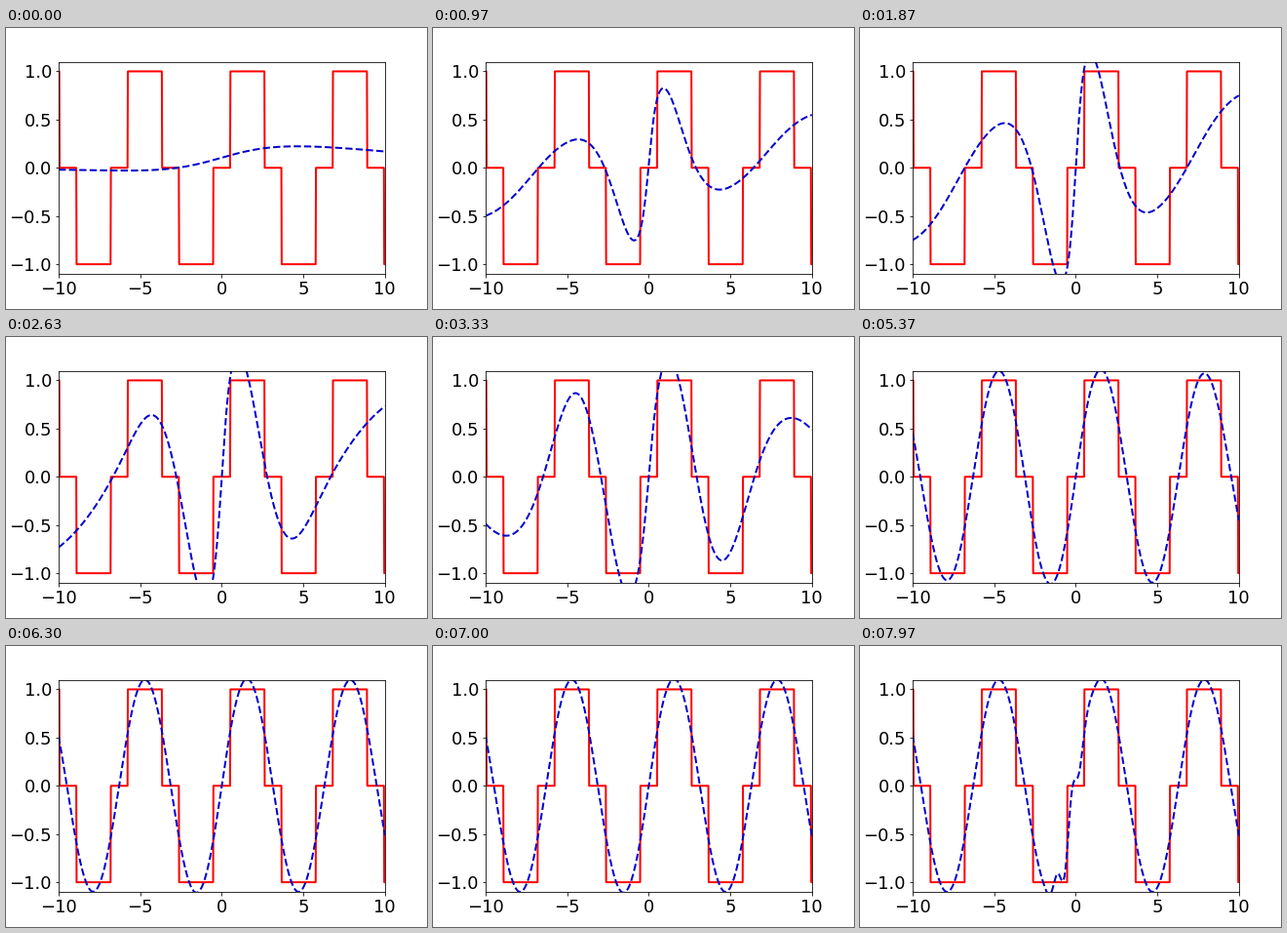
A matplotlib script that plays this animation: 432x288 px, repeating every 8000 ms.

```python
import numpy as np
import matplotlib.pyplot as plt
from matplotlib.animation import FuncAnimation

FRAMES = 240
LOOP = 8000

x = np.linspace(-10, 10, 1000)
r = np.abs(x)
steps = np.round(np.sin(x))

# Untrained curve
start = .105 + .19 * np.tanh(x / 3.3) - .0095 * x - .0003 * x**2


def smooth(u):
    u = np.clip(u, 0, 1)
    return u * u * (3 - 2 * u)


def bell(u):
    return np.exp(-u * u)


def wave(age):
    """Sine whose outer swings are stretched and damped while it is young."""
    bend = .03 + .97 * bell(age / 1.7)
    phase = r + bend * (.5 * np.tanh(2 * r) - 3.25 * (r / 10)**3)
    centre = 5 + 2.4 * age
    dip = .65 * bell(age / 2.7) * bell((r - centre) / 4.5)
    amp = 1.1 + .48 * bend * bell(r / 2) - dip
    return np.sign(x) * amp * np.sin(phase)


def kink():
    u = x + .46
    return .25 * np.sin(6 * u) * bell(u / .85)


def curve(n):
    t = n * LOOP / FRAMES / 1000
    mix = smooth(t / 1.6)
    late = np.clip(t - 7, 0, 1)**1.6
    return (1 - mix) * start + mix * wave(max(t - 1.87, 0)) + late * kink()


plt.rcParams["font.family"] = "DejaVu Sans"
fig, ax = plt.subplots(figsize=(6, 4), dpi=72)
fig.subplots_adjust(left=.125, right=.9, bottom=.125, top=.88)
ax.set(xlim=(-10, 10), ylim=(-1.1, 1.1),
       xticks=np.arange(-10, 11, 5), yticks=np.arange(-1, 1.1, .5))
ax.tick_params(labelsize=18)
ax.plot(x, steps, color="red", lw=2)
fit, = ax.plot(x, start, "--", color="mediumblue", lw=2)


def update(n):
    fit.set_ydata(curve(n))
    return fit,


anim = FuncAnimation(fig, update, frames=FRAMES, interval=LOOP / FRAMES,
                     repeat=True, repeat_delay=0)
plt.show()
```
